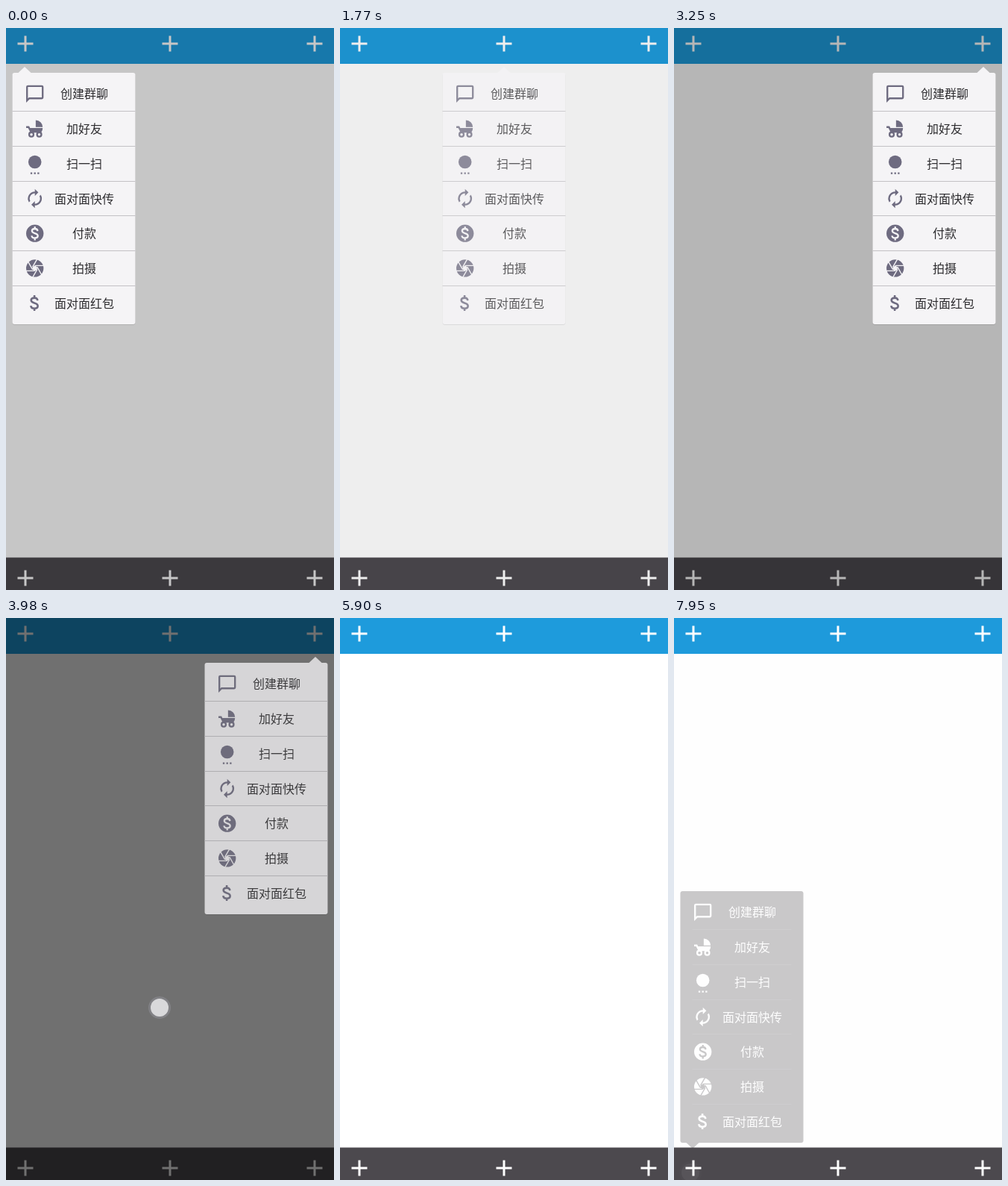
Animation of 440x753 px, one loop 8000 ms. Source, as an HTML page:

```html
<!DOCTYPE html>
<html lang="zh-CN">
<head>
<meta charset="utf-8">
<title>弹出菜单</title>
<style>
  html, body { margin: 0; width: 100%; height: 100%; overflow: hidden; background: #fff; }
  svg { display: block; width: 100%; height: 100%; }
  text { font: 16px "Noto Sans CJK SC", "Noto Sans CJK", sans-serif; text-anchor: middle; fill: var(--text); }
  .light { --panel: #f5f4f6; --icon: #6e6b80; --text: #2d2c2f; --rule: #c3c1c5; }
  .dark { --panel: #4c494e; --icon: #fff; --text: #fff; --rule: #5e5b60; }
  .panel { fill: var(--panel); }
  .rule { stroke: var(--rule); }
  .fill { fill: var(--icon); }
  .line { fill: none; stroke: var(--icon); stroke-width: 2; }
  .cut { fill: none; stroke: var(--panel); }
  .hole { fill: var(--panel); }
  .plus { stroke: #fff; stroke-width: 3; }
</style>
</head>
<body>
<svg id="stage" viewBox="0 0 440 753" preserveAspectRatio="none">
  <defs>
    <path id="dollar" d="M15.1 9c-.1-2-1.5-3-3.6-3s-3.8 1-3.8 2.8c0 4.2 7.7 2 7.7 6.5 0 1.9-1.6 2.8-3.9 2.8-2.5 0-4-1.1-4.1-3.1M11.5 3v3M11.5 18v3"/>
    <path id="blade" d="M9.4 10.5L14.9 1"/>
    <g id="icon0"><path class="line" d="M3 19.6V4q0-1 1-1H20q1 0 1 1V16q0 1-1 1H5.6z"/></g>
    <g id="icon1">
      <path class="fill" d="M13 2v8h8a8 8 0 0 0-8-8zM2 9h3.5l1 2H21a8 8 0 0 1-2 5.5H7L4.2 11H2z"/>
      <circle class="line" cx="8" cy="18.5" r="2.5"/><circle class="line" cx="17" cy="18.5" r="2.5"/>
    </g>
    <g id="icon2">
      <circle class="fill" cx="12" cy="10" r="7.5"/>
      <path class="fill" d="M7 22h2v2h-2zM11 22h2v2h-2zM15 22h2v2h-2z"/>
    </g>
    <g id="icon3">
      <path id="half" class="fill" d="M12 6v3l4-4-4-4v3a8 8 0 0 0-6.76 12.26L6.7 14.8A6 6 0 0 1 12 6z"/>
      <use href="#half" transform="rotate(180 12 12)"/>
    </g>
    <g id="icon4">
      <circle class="fill" cx="12" cy="12" r="10"/>
      <use href="#dollar" class="cut" stroke-width="2.2" transform="translate(1.9 1.4) scale(.88)"/>
    </g>
    <g id="icon5">
      <circle class="fill" cx="12" cy="12" r="10"/>
      <path class="hole" d="M9.4 10.5L12 9l2.6 1.5v3L12 15l-2.6-1.5z"/>
      <g id="blades" class="cut" stroke-width="1.2"></g>
    </g>
    <g id="icon6"><use href="#dollar" class="line" style="stroke-width:2.2"/></g>
  </defs>
  <rect width="440" height="753" fill="#fff"/>
  <rect width="440" height="48" fill="#1e9bdc"/>
  <rect y="709.5" width="440" height="44" fill="#4c494e"/>
  <g id="pluses" class="plus"></g>
  <rect id="dim" width="440" height="753" opacity="0"/>
  <g id="menus"></g>
  <g id="taps"></g>
</svg>
<script>
const LOOP = 8000, TICK = 147.4, FADE_LEAD = 65;
const LABELS = ['创建群聊', '加好友', '扫一扫', '面对面快传', '付款', '拍摄', '面对面红包'];
const ROW = 46.7;

// Panel left edge, pointer x, placement, and when it opens and closes
const MENUS = [
  { x: 8.5, tip: 25, open: -208, close: 745, closeMs: 250 },
  { x: 137.5, tip: 220, open: 1660, close: 2342 },
  { x: 266.5, tip: 415, open: 3000, close: 3897 },
  { x: 266.5, tip: 415, bottom: true, open: 4666, close: 5330 },
  { x: 137.5, tip: 220, bottom: true, open: 6100, close: 7120 },
  { x: 8.5, tip: 25, bottom: true, open: 7930, close: 9000 }
];
const TAPS = [
  { x: 314.5, y: 509, from: 2450, to: 2640, alpha: .75 },
  { x: 206, y: 522, from: 3680, to: 4100, alpha: 1 },
  { x: 22, y: 743, from: 7900, to: 8000, alpha: .08 }
];

const byId = id => document.getElementById(id);
const clamp = v => Math.min(1, Math.max(0, v));
const ease = v => (1 - Math.cos(Math.PI * clamp(v))) / 2;

function addGroup(parent, markup, className = '') {
  const g = document.createElementNS('http://www.w3.org/2000/svg', 'g');
  g.setAttribute('class', className);
  g.innerHTML = markup;
  return byId(parent).appendChild(g);
}

function menuMarkup({ x, tip, bottom }) {
  const top = bottom ? 366 : 60;
  const inset = bottom ? 16 : 0;
  const pointer = bottom ? `M${tip - 9} 702.5h18l-9 8.5z` : `M${tip - 9} 60.5h18l-9-8.5z`;
  const rows = LABELS.map((label, i) => {
    const mid = top + 28.4 + i * ROW;
    const ruleY = Math.round(mid + ROW / 2 - .5) + .5;
    const rule = i < LABELS.length - 1
      ? `<path class="rule" d="M${x + inset} ${ruleY}H${x + 165 - inset}"/>` : '';
    return `${rule}<use href="#icon${i}" transform="translate(${x + 16.2} ${mid - 14}) scale(1.167)"/>
      <text x="${x + 96.5}" y="${mid + 6}">${label}</text>`;
  });
  return `<rect x="${x}" y="${top + .8}" width="165" height="337" rx="3" opacity=".15"/>
    <rect class="panel" x="${x}" y="${top}" width="165" height="337" rx="3"/>
    <path class="panel" d="${pointer}"/>${rows.join('')}`;
}

for (let i = 0; i < 6; i++)
  addGroup('blades', `<use href="#blade" transform="rotate(${i * 60} 12 12)"/>`);
for (const y of [21, 737])
  for (const x of [26, 220, 414])
    addGroup('pluses', `<path d="M${x - 10.5} ${y}h21M${x} ${y - 10.5}v21"/>`);
for (const menu of MENUS)
  menu.node = addGroup('menus', menuMarkup(menu), menu.bottom ? 'dark' : 'light');
for (const tap of TAPS)
  tap.node = addGroup('taps', `<circle cx="${tap.x}" cy="${tap.y}" r="15" fill="#cac7de" opacity=".2"/>
    <circle cx="${tap.x}" cy="${tap.y}" r="12" fill="#fff" opacity=".7"/>`);

function render(t) {
  let dim = 0;
  for (const { node, open, close, closeMs = 500 } of MENUS) {
    dim += ease((t - open) / 500) - ease((t - close) / closeMs);
    node.setAttribute('opacity',
      ease((t - open + FADE_LEAD) / 260) - ease((t - close) / (closeMs * .52)));
  }
  byId('dim').setAttribute('opacity', .6 * clamp(dim));
  for (const { node, from, to, alpha } of TAPS)
    node.setAttribute('opacity', t >= from && t < to ? alpha : 0);
}

function play() {
  const t = performance.now() % LOOP;
  render(Math.floor((t + 10) / TICK) * TICK);
  requestAnimationFrame(play);
}
play();
</script>
</body>
</html>
```
